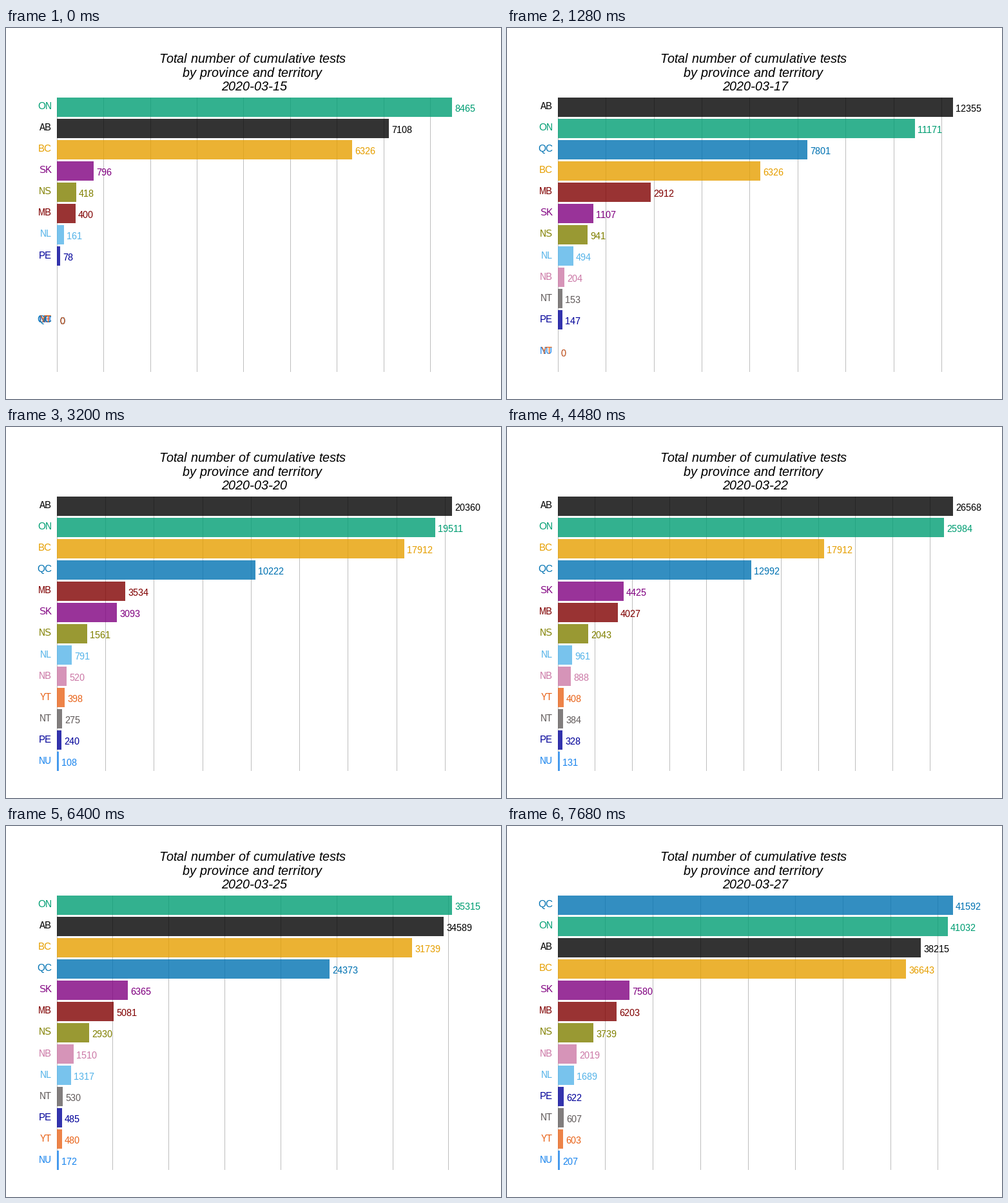
Recreate the animation shown at these times as a matplotlib script. Size 768 px wide and 576 px high, loop 8000 ms.

```python
import numpy as np
import matplotlib.pyplot as plt
from matplotlib.animation import FuncAnimation
from matplotlib.patches import Rectangle

W, H, DPI = 768, 576, 96
LEFT, RIGHT, TOP, BOTTOM = 78.6, 691.9, 108, 534
BAR = 0.9
FIRST_DAY, LAST_DAY = 15, 27
HOLD = 4          # frames per day, the last one is the halfway step

plt.rcParams.update({
    "font.family": "Liberation Sans",
    "text.hinting": "native",      # whole-pixel glyph advances
    "text.hinting_factor": 1,
})

# Cumulative tests on a few key days, in drawing order.
KEY_DAYS = [15, 17, 20, 24, 27]
TESTS = {
    "AB": ("#000000", [7108, 12355, 20360, 32776, 38215]),
    "BC": ("#E69F00", [6326, 6326, 17912, 31739, 36643]),
    "MB": ("#800000", [400, 2912, 3534, 4520, 6203]),
    "NB": ("#CC79A7", [0, 204, 520, 1255, 2019]),
    "NL": ("#56B4E9", [161, 494, 791, 1131, 1689]),
    "NS": ("#808000", [418, 941, 1561, 2525, 3739]),
    "NT": ("#625C5C", [0, 153, 275, 492, 607]),
    "NU": ("#1C86EE", [0, 0, 108, 154, 207]),
    "ON": ("#009E73", [8465, 11171, 19511, 32457, 41032]),
    "PE": ("#000099", [78, 147, 240, 416, 622]),
    "QC": ("#0072B2", [0, 7801, 10222, 15763, 41592]),
    "SK": ("#800080", [796, 1107, 3093, 5757, 7580]),
    "YT": ("#E9641A", [0, 0, 398, 418, 603]),
}
SPORADIC = {"BC"}     # holds its last count until the next report


def daily_counts(code):
    days = np.arange(FIRST_DAY, LAST_DAY + 1)
    counts = np.array(TESTS[code][1])
    if code in SPORADIC:
        return counts[np.searchsorted(KEY_DAYS, days, side="right") - 1]
    return np.round(np.interp(days, KEY_DAYS, counts))


def average_rank(v):
    above = (v[None, :] > v[:, None]).sum(axis=1)
    ties = (v[None, :] == v[:, None]).sum(axis=1)
    return above + (ties + 1) / 2


CODES = list(TESTS)
COLORS = [TESTS[c][0] for c in CODES]
VALUES = np.array([daily_counts(c) for c in CODES]).T
RANKS = np.array([average_rank(v) for v in VALUES])
ROW = (BOTTOM - TOP) / (len(CODES) - 1 + BAR)


def major_step(top, target=5):
    """Nice axis step, scored by simplicity, coverage and density."""
    best = (-np.inf, top)
    nice = [1, 5, 2, 2.5, 4, 3]
    power = np.floor(np.log10(top))
    for i, q in enumerate(nice):
        for e in (power - 1, power):
            step = q * 10 ** e
            for k in range(1, 12):
                end = k * step
                simple = 1 - i / (len(nice) - 1)
                cover = 1 - 0.5 * ((top - end) / (0.1 * top)) ** 2
                ratio = (k / end) / ((target - 1) / max(end, top))
                dense = 2 - max(ratio, 1 / ratio)
                score = 0.25 * simple + 0.2 * cover + 0.5 * dense
                best = max(best, (score, step))
    return best[1]


fig = plt.figure(figsize=(W / DPI, H / DPI), dpi=DPI, facecolor="white")
ax = fig.add_axes([0, 0, 1, 1])


def box(x0, y0, x1, y1, color, alpha=1):
    ax.add_patch(Rectangle((x0, y0), x1 - x0, y1 - y0, facecolor=color,
                           alpha=alpha, linewidth=0))


def write(x, y, text, size=11, color="black", **kw):
    ax.text(x, y, text, fontsize=size, color=color, va="baseline", **kw)


def draw(n):
    ax.clear()
    ax.set_xlim(0, W)
    ax.set_ylim(H, 0)
    ax.axis("off")

    day, step = divmod(n, HOLD)
    if step == HOLD - 1:
        values = (VALUES[day] + VALUES[day + 1]) / 2
        ranks = (RANKS[day] + RANKS[day + 1]) / 2
        shown = VALUES[day + 1]
    else:
        values, ranks, shown = VALUES[day], RANKS[day], VALUES[day]

    top = values.max()

    def to_px(v):
        return round(LEFT + v / top * (RIGHT - LEFT))

    xs = [to_px(v) for v in values]
    ys = TOP + (ranks - 1 + BAR / 2) * ROW

    for v in np.arange(0, top, major_step(top) / 2):
        box(to_px(v), TOP, to_px(v) + 1, BOTTOM, "#BEBEBE")

    half = BAR * ROW / 2
    for x, y, color in zip(xs, ys, COLORS):
        box(to_px(0), round(y - half), x, round(y + half), color, 0.8)
    for y, code, color in zip(ys, CODES, COLORS):
        write(71, round(y + 3.5), code, color=color, ha="right")
    for x, y, v, color in zip(xs, ys, shown, COLORS):
        write(x + 4, round(y + 7), f"{v:.0f}", color=color, ha="left")

    title = [(382.5, 54, "Total number of cumulative tests"),
             (382.5, 76, "by province and territory"),
             (385.5, 97, f"2020-03-{FIRST_DAY + day}")]
    for x, y, line in title:
        write(x, y, line, 15, ha="center", style="italic")
    return []


anim = FuncAnimation(fig, draw, frames=50, interval=160, init_func=lambda: [],
                     repeat=True, repeat_delay=0, blit=False)
plt.show()
```
